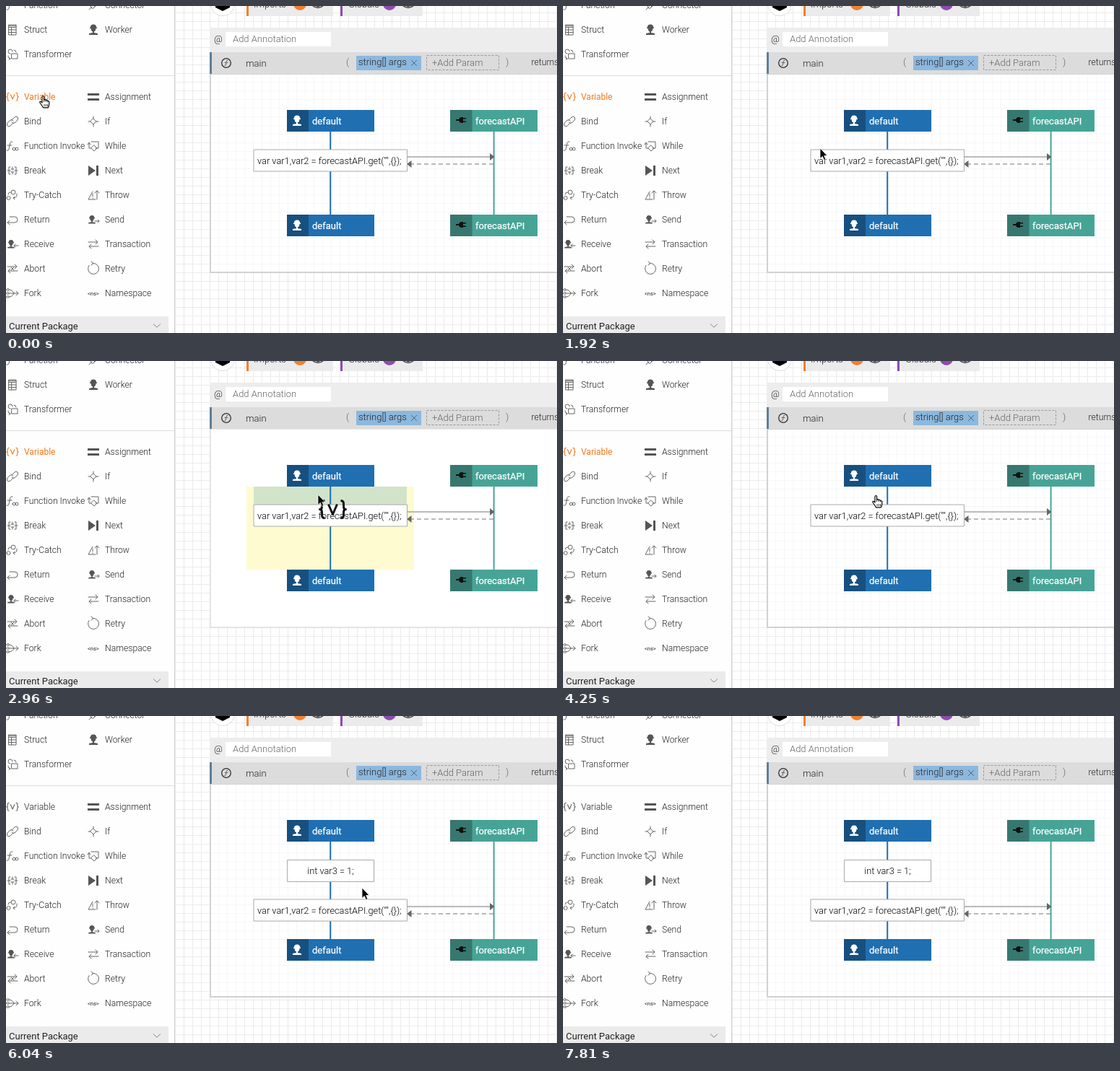
An HTML page that plays this animation: 763x453 px, repeating every 9000 ms.

```html
<!DOCTYPE html>
<html lang="en">
<head>
<meta charset="utf-8">
<title>Add a variable to a worker</title>
<style>
html, body { margin: 0; width: 100%; height: 100%; overflow: hidden; background: #fff; }
svg { display: block; width: 763px; height: 453px; }
text { font-family: Roboto, Arial, sans-serif; font-size: 13px; font-weight: 300; fill: #222; white-space: pre; }
.side text { font-size: 12.2px; }
.ink { fill: none; stroke: #666; stroke-width: 1; stroke-linecap: round; stroke-linejoin: round; }
.solid { fill: #555; stroke: none; }
text.tag { fill: #fff; stroke: #fff; stroke-width: .25; font-weight: 400; }
text.faint { fill: #666; }
.stmt { fill: #fff; stroke: #aaa; }
.code { font-size: 12.8px; fill: #000; }

.anim, #pick text, #pick .ink { animation: 9s step-end infinite; }
#pick text { animation-name: label; font-weight: 400; font-size: 12px; }
#pick .ink { animation-name: outline; }
#body { animation-name: body; }
#zone, #ghost { animation-name: drag; }
#fresh { animation-name: fresh; opacity: 0; }
#tools { animation-name: tools; opacity: 0; }
.ends { animation-name: ends; }
#call { animation-name: call; }
#cursor { animation-name: cursor; }
#hand { animation-name: hand; }
#arrow { animation-name: arrow; }

@keyframes label { 0% { fill: #f27a1e; font-weight: 400; font-size: 12px } 58.888%, 100% { fill: #222; font-weight: 300; font-size: 12.2px } }
@keyframes outline { 0% { stroke: #f27a1e } 58.888%, 100% { stroke: #666 } }
@keyframes body {
  0% { fill-opacity: .6; stroke-width: 2; height: 275px }
  23% { fill-opacity: 1; stroke-width: 1; height: 275px }
  47.222% { fill-opacity: .6; stroke-width: 2; height: 275px }
  67.111%, 100% { fill-opacity: .6; stroke-width: 2; height: 295px }
}
@keyframes drag { 0% { opacity: 0 } 23% { opacity: 1 } 47.222%, 100% { opacity: 0 } }
@keyframes fresh { 0% { opacity: 0 } 67.111%, 100% { opacity: 1 } }
@keyframes tools { 0% { opacity: 0 } 60.555% { opacity: 1 } 67.111%, 100% { opacity: 0 } }
@keyframes ends { 0% { transform: none } 67.111%, 100% { transform: translateY(20px) } }
@keyframes call { 0% { transform: none } 67.111%, 100% { transform: translateY(55px) } }
@keyframes hand {
  0% { opacity: 1 } 11.666% { opacity: 0 } 47.222% { opacity: 1 } 58.888%, 100% { opacity: 0 }
}
@keyframes arrow {
  0% { opacity: 0 } 11.666% { opacity: 1 } 47.222% { opacity: 0 }
  58.888% { opacity: 1 } 86.777%, 100% { opacity: 0 }
}
@keyframes cursor {
  0% { transform: translate(46px, 124px) }
  11.666% { transform: translate(95px, 133px) }
  13.222% { transform: translate(190px, 156px) }
  14.888% { transform: translate(272px, 176px) }
  16.444% { transform: translate(319px, 187px) }
  19.777% { transform: translate(341px, 193px) }
  21.333% { transform: translate(356px, 197px) }
  23% { transform: translate(374px, 199px) }
  24.666% { transform: translate(391px, 197px) }
  26.333% { transform: translate(406px, 194px) }
  27.888% { transform: translate(417px, 190px) }
  29.555% { transform: translate(426px, 187px) }
  31.222% { transform: translate(432px, 186px) }
  32.888% { transform: translate(432px, 185px) }
  47.222% { transform: translate(428px, 186px) }
  58.888% { transform: translate(441px, 198px) }
  60.555% { transform: translate(461px, 219px) }
  62.111% { transform: translate(474px, 233px) }
  67.111% { transform: translate(493px, 238px) }
  68.777% { transform: translate(532px, 247px) }
  70.444% { transform: translate(570px, 255px) }
  72% { transform: translate(593px, 260px) }
  73.666% { transform: translate(601px, 262px) }
  76.888% { transform: translate(560px, 196px) }
  78.555% { transform: translate(470px, 177px) }
  80.222% { transform: translate(425px, 250px) }
  81.888% { transform: translate(475px, 360px) }
  83.444% { transform: translate(600px, 402px) }
  85.111%, 100% { transform: translate(697px, 340px) }
}
</style>
</head>
<body>
<svg viewBox="0 0 763 453">
  <defs>
    <pattern id="grid" width="12" height="12" patternUnits="userSpaceOnUse" x="234" y="9">
      <path d="M.5 0V12M0 .5H12" stroke="#ebebeb" fill="none"/>
    </pattern>
    <path id="braces" fill="none" stroke-linejoin="round" d="M8 1Q4 1 4 5V9Q4 13 1 13Q4 13 4 17V21Q4 25 8 25M13 6L19 20L25 6M30 1Q34 1 34 5V9Q34 13 37 13Q34 13 34 17V21Q34 25 30 25"/>
    <path id="man" d="M-4-4Q-4-7.500 0-7.500Q4-7.500 4-4L5-3V-2H3.500Q3 2 1 2.500V4L6 5V7H-6V5L-1 4V2.500Q-3 2-3.500-2H-5V-3Z"/>
    <path id="plug" d="M-7-1H-3Q-2-4 1-4H3V-3H7V-1.600H3V1.600H7V3H3V4H1Q-2 4-3 1H-7Z"/>
    <g id="eye"><path d="M-9 0Q0-9 9 0Q0 9-9 0Z" fill="none" stroke="#444" stroke-width="1.600"/><circle r="3.400" fill="#444"/></g>
    <g id="worker">
      <path fill="#1f6fb1" d="M389 0h121v30H389z"/>
      <path fill="#17507f" d="M389 0h30v30h-30z"/>
      <use href="#man" x="403" y="15" fill="#fff"/>
      <text class="tag" x="424" y="20">default</text>
    </g>
    <g id="client">
      <path fill="#46a497" d="M615 0h121v30H615z"/>
      <path fill="#36786f" d="M615 0h30.500v30H615z"/>
      <use href="#plug" x="630" y="14" fill="#111"/>
      <text class="tag" x="650" y="20">forecastAPI</text>
    </g>
  </defs>

  <path fill="#fff" d="M0 0h763v453H0z"/>
  <path fill="url(#grid)" d="M234 0h529v453H234z"/>

  <!-- package header -->
  <circle cx="300" cy="-3" r="16.500" fill="#fff" stroke="#ddd"/>
  <path d="M290-8H310V2L300 7L290 2Z"/>
  <path fill="#ebebeb" d="M333 0h120v14H333zM463 0h114v14H463z"/>
  <path fill="#f0802f" d="M333 0h3v14h-3z"/>
  <path fill="#8f4bb0" d="M463 0h3v14h-3z"/>
  <text x="343" y="2">Imports</text>
  <text x="474" y="2">Globals</text>
  <circle cx="407" cy="-3" r="9" fill="#f0802f"/>
  <circle cx="531" cy="-3" r="9" fill="#8f4bb0"/>
  <use href="#eye" x="432" y="-2"/>
  <use href="#eye" x="557" y="-2"/>

  <!-- function panel -->
  <rect id="body" class="anim" x="283" y="94" width="500" height="275" fill="#fff" fill-opacity=".6" stroke="#d2d2d2"/>
  <path fill="#ededed" d="M282 30h481v34H282z"/>
  <path fill="#dcdcdc" d="M282 64h481v30H282z"/>
  <path fill="#5d7f98" d="M282 64h3v30h-3z"/>
  <path fill="#fff" d="M304 36h146v20H304z"/>
  <text x="288" y="50">@</text>
  <text class="faint" x="314" y="50">Add Annotation</text>
  <circle cx="305" cy="79" r="6.300" fill="none" stroke="#333" stroke-width="1.300"/>
  <path class="ink" d="M307 75.500Q305 75 305 77.500L304.500 81Q304.300 83 302.800 82.500M303 78.500H307"/>
  <text x="332" y="84">main</text>
  <text class="faint" x="471" y="82">(</text>
  <path fill="#8cb8de" d="M485 69h90v20h-90z"/>
  <text x="488" y="82">string[] args</text>
  <path d="M561 75l8 8m0-8l-8 8" stroke="#4d6a82" fill="none"/>
  <path d="M582.500 68.500h100v20h-100z" fill="none" stroke="#999" stroke-dasharray="3 2"/>
  <text class="faint" x="590" y="83">+Add Param</text>
  <text class="faint" x="692" y="82">)</text>
  <text x="727.500" y="82" style="font-size:12.200px">returns</text>

  <!-- diagram -->
  <g id="zone" class="anim" opacity="0">
    <path fill="#fffbd0" d="M333 174h232v115H333z"/>
    <path fill="#d1e4ca" d="M343 174h212v25H343z"/>
  </g>
  <path fill="#1f6fb1" d="M448.200 174h2v135h-2z"/>
  <path fill="#46a497" d="M674.600 174h2v135h-2z"/>
  <g class="anim ends">
    <use href="#worker" y="289"/>
    <use href="#client" y="289"/>
  </g>
  <use href="#worker" y="144"/>
  <use href="#client" y="144"/>
  <g id="fresh" class="anim">
    <path class="stmt" d="M389.500 199.500h120v30h-120z"/>
    <text class="code" x="449.500" y="219" text-anchor="middle">int var3 = 1;</text>
  </g>
  <g id="call" class="anim">
    <path d="M556 209H671" stroke="#777" fill="none"/>
    <path d="M675 219H561" stroke="#777" stroke-dasharray="6 4" fill="none"/>
    <path fill="#666" d="M670 204L676.500 209L670 214ZM561.500 214L555 219L561.500 224Z"/>
    <path class="stmt" d="M343 199h212.500v30H343z"/>
    <text class="code" x="348" y="219">var var1,var2 = forecastAPI.get("",{});</text>
  </g>
  <g id="tools" class="anim">
    <circle cx="556" cy="214" r="10" fill="#2c95e4"/>
    <path d="M550 214H561M557 210L561 214L557 218" fill="none" stroke="#fff" stroke-width="1.500"/>
    <path fill="#fff" stroke="#aaa" d="M424.500 231.500h49v20h-49z"/>
    <path class="solid" d="M427 237h12v1.500h-12zM431 235h4v1.500h-4zM428 239.500h10v8.500h-10z"/>
    <path d="M431 241v5.500m2-5.500v5.500m2-5.500v5.500" stroke="#fff" fill="none"/>
    <circle cx="449" cy="241.500" r="7" fill="#f2606f"/>
    <path class="ink" style="stroke:#333" d="M462 235.500Q460 235.500 460 238V240L458.500 241.500L460 243V245Q460 247.500 462 247.500M468 235.500Q470 235.500 470 238V240L471.500 241.500L470 243V245Q470 247.500 468 247.500M463 239.500H467M463 241.500H467M463 243.500H467"/>
  </g>

  <!-- tool palette -->
  <g class="side">
    <path fill="#fefefe" d="M0 0h233v453H0z"/>
    <path d="M233.500 0V453" stroke="#cfcfcf"/>
    <path d="M0 96.500H233" stroke="#ddd"/>
    <g id="list"></g>
    <g id="pick">
      <use class="ink" href="#braces" transform="translate(.5 120) scale(.45)" style="stroke-width:2.600"/>
      <text x="25" y="130">Variable</text>
    </g>
    <path fill="#ebebeb" d="M0 430h225v23H0z"/>
    <text x="4" y="448" style="font-size:13px;font-weight:400">Current Package</text>
    <path d="M204 440.500l5 4.500l5-4.500" fill="none" stroke="#888"/>
  </g>

  <g id="cursor" class="anim">
    <g id="ghost" class="anim" opacity="0">
      <use href="#braces" x="1.500" y="7.500" stroke="#111" stroke-width="3"/>
    </g>
    <path id="arrow" class="anim" d="M0 0V14.500L3.300 11.400L5.500 16.500L7.800 15.500L5.700 10.500H10Z" fill="#000" stroke="#fff" stroke-width=".8"/>
    <g id="hand" class="anim" fill="#fff" stroke="#000" stroke-linejoin="round">
      <path stroke-width="1.200" d="M4 10V2Q4 .5 5.300 .5Q6.600 .5 6.600 2V6.500Q7 5.500 8.200 5.700Q9.300 5.900 9.300 7Q9.700 6.200 10.800 6.500Q11.700 6.800 11.700 7.800Q12.300 7.300 13 7.700Q13.800 8.100 13.800 9V12Q13.500 14.500 12.300 16.800H5.500Q4 14 1.300 10.500Q.300 9 1.300 8.400Q2.500 8 4 10Z"/>
      <path d="M6.600 6.500V9M9.300 7V9M11.700 8V9.500M7 12v3M9.300 12v3M11.500 12v3" stroke-width=".8" fill="none"/>
    </g>
  </g>
</svg>
<script>
const swap = "M-7-3H6L3-6M7 3H-6L-3 6M3 0L6-3M-3 0L-6 3";
const func = "M0-6Q-3-7-3.500-3L-5 4Q-5.500 7-8 6M-7-1H-1";
const man = "@man";
// column, row, label, icon path centred on zero
const items = [
  [0, -1, "Function", func],
  [1, -1, "Connector", "M-6 6L-2 2M-2-2L2 2L0 4Q-4 5-4 1ZM2 2L6-2M0-4L4 0"],
  [0, 0, "Struct", "M-5-7H5V7H-5ZM-5-5.500H5M-5-3.500H5M-5 0H5M-5 3.500H5M-1.500-3.500V7"],
  [1, 0, "Worker", man],
  [0, 1, "Transformer", "M-3-1A3 3 0 1 1 0-4M-1-1H7V6H-1ZM-6 2Q-6 6-3 6M-5 4.500L-3 6L-5 7.500M2-6Q5-6 5-3"],
  [1, 3, "Assignment", "#M-8-5H8V-2H-8ZM-8 2H8V5H-8Z"],
  [0, 4, "Bind", "M-1-2L3-6Q5-8 7-6Q8-4 7-2L3 2Q1 3-1 1M1 2L-3 6Q-5 8-7 6Q-8 4-7 2L-3-2Q-1-3 1-1"],
  [1, 4, "If", "M0-7V-4M0-4L4 0L0 4L-4 0ZM0 4V7M-7 0H-4M4 0H7"],
  [0, 5, "Function Invoke", func + "M0 4a2 2 0 1 0 4 0a2 2 0 1 0-4 0M4 4a2 2 0 1 0 4 0a2 2 0 1 0-4 0"],
  [1, 5, "While", "M-3-6H7V3H3M1-1L5 3L1 7L-3 3ZM-3 3H-6V-4M-8-2L-6-5L-4-2"],
  [0, 6, "Break", "M-3-5H-5V5H-3M3-5H5V5H3M-2-2H2M-2 2H2M-7 0H-3M3 0H7M0-5V-2M0 2V5"],
  [1, 6, "Next", "#M-7-7L3 0L-7 7ZM4-7H7V7H4Z"],
  [0, 7, "Try-Catch", "M-2-4A3 3 0 1 1 4-4A3 3 0 1 1-2-4M-8 4A2.500 2.500 0 1 1-3 4A2.500 2.500 0 1 1-8 4M-6-1Q-6-4-3-4M6-2Q7 4 1 4M3 2L1 4L3 6"],
  [1, 7, "Throw", "M-1-5L-7 6H3M-1-2V2M-1 4V4.500M5 6V-6M2-3L5-6L8-3"],
  [0, 8, "Return", "M-4-4H3Q7-4 7 0Q7 4 3 4H-7M-4 1L-7 4L-4 7"],
  [1, 8, "Send", man, "M2 2H8M6 0L8 2L6 4"],
  [0, 9, "Receive", man, "M8 2H2M4 0L2 2L4 4"],
  [1, 9, "Transaction", swap],
  [0, 10, "Abort", swap + "M-2-2L2 2M2-2L-2 2"],
  [1, 10, "Retry", "M-1-7.500A7.500 7.500 0 1 1-6-4.500M-3-10L0-7.500L-3-5"],
  [0, 11, "Fork", "M-5 0H8M5-3L8 0L5 3M-5-5Q0-5 2 0M-5 5Q0 5 2 0M-8-5a1.500 1.500 0 1 0 3 0a1.500 1.500 0 1 0-3 0M-8 0a1.500 1.500 0 1 0 3 0a1.500 1.500 0 1 0-3 0M-8 5a1.500 1.500 0 1 0 3 0a1.500 1.500 0 1 0-3 0"],
  [1, 11, "Namespace", "ns"]
];

const stroke = d => `<path class="ink" d="${d}"/>`;

function icon(d, extra) {
  if (d === man && extra) {
    return '<use class="solid" href="#man" transform="translate(-2 0) scale(.8)"/>' + stroke(extra);
  }
  if (d === man) return '<use class="solid" href="#man"/>';
  if (d === "ns") return '<text x="-8" y="3" style="font-size:7.5px;font-weight:400">&lt;ns&gt;</text>';
  if (d[0] === "#") return `<path class="solid" d="${d.slice(1)}"/>`;
  return stroke(d);
}

document.getElementById("list").innerHTML = items.map(([col, row, label, d, extra]) => {
  // rows below the divider start at 126
  const y = row < 2 ? 33 + row * 34 : 126 + (row - 3) * 34;
  return `<g transform="translate(${col ? 121 : 9} ${y})">${icon(d, extra)}</g>
    <text x="${col ? 137 : 25}" y="${y + 4}">${label}</text>`;
}).join("");
</script>
</body>
</html>
```
